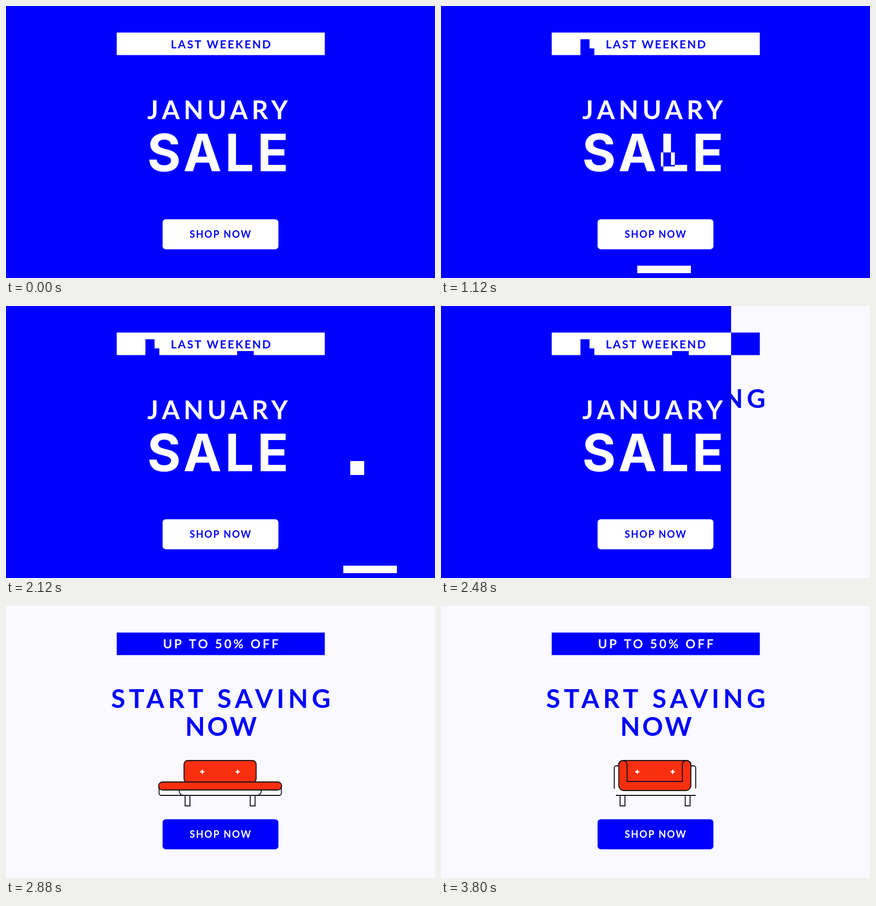
Recreate the animation shown at these times as an HTML page with a canvas. Size 800 by 507 pixels, loop 3.92 s.

```html
<!DOCTYPE html>
<html lang="en">
<head>
<meta charset="utf-8">
<title>January sale</title>
<style>
  html, body { margin: 0; width: 100%; height: 100%; overflow: hidden; background: #00f; }
  canvas { display: block; width: 100vw; height: 100vh; }
</style>
</head>
<body>
<canvas id="stage" width="800" height="507"></canvas>
<script>
const ctx = document.getElementById('stage').getContext('2d');
const W = 800, H = 507, LOOP = 3920, STEP = 40;
const BLUE = '#0000ff', WHITE = '#ffffff', PAPER = '#f9f9ff', RED = '#fa2f0f', INK = '#17121c';
const SANS = 'Lato, "Open Sans", sans-serif', HEAVY = 'Inter, Roboto, sans-serif';

const key = (t, x, y) => ({ t, x, y });

// The ball flies straight from bounce to bounce, then misses the paddle
const BALL_TOP = 62, PADDLE_TOP = 484, BALL = 26, REST = PADDLE_TOP - BALL;
const bounces = [
  key(0, -48, 292), key(232, 84, REST), key(680, 260, BALL_TOP), key(965, 387, REST),
  key(1280, 434, 83), key(1560, 462, REST), key(1920, 643, 1), key(2280, 642, 520)
];
const paddle = [
  key(0, -100), key(520, 127), key(1120, 366), key(1560, 400), key(2120, 629), key(2280, 682)
];
const WIPE_START = 2440, WIPE_TIME = 280;
const SOFA_START = 2880, SOFA_TIME = 400 / 3;

function along(path, t) {
  const i = path.findIndex(k => k.t > t);
  if (i < 0) return path[path.length - 1];
  const a = path[i - 1], b = path[i], p = (t - a.t) / (b.t - a.t);
  return { x: Math.round(a.x + (b.x - a.x) * p), y: Math.round(a.y + (b.y - a.y) * p) };
}

function rect(x, y, w, h, color) {
  ctx.fillStyle = color;
  ctx.fillRect(x, y, w, h);
}

function text(str, cx, y, size, spacing, color, font = SANS) {
  ctx.font = `700 ${size}px ${font}`;
  ctx.letterSpacing = spacing + 'px';
  ctx.textAlign = 'center';
  ctx.fillStyle = color;
  ctx.fillText(str, cx + spacing / 2, y);
}

function stroke() {
  ctx.strokeStyle = INK;
  ctx.lineWidth = 1.8;
  ctx.stroke();
}

function shape(x, y, w, h, r, fill) {
  ctx.beginPath();
  ctx.roundRect(x, y, w, h, r);
  ctx.fillStyle = fill;
  ctx.fill();
}

function box(...args) {
  shape(...args);
  stroke();
}

function banner(str, size, spacing, fill, ink) {
  rect(206.5, 49.5, 388, 42, fill);
  text(str, 400.5, 78.5, size, spacing, ink);
}

function button(fill, ink) {
  shape(292, 397.5, 216, 56, 6, fill);
  text('SHOP NOW', 399.5, 432, 18, 1.9, ink);
}

function studs() {
  for (const x of [366, 432]) {
    rect(x - 4, 307.8, 8, 2.4, WHITE);
    rect(x - 1.2, 305, 2.4, 8, WHITE);
  }
}

function legs() {
  for (const x of [334, 455.5]) box(x, 353, 9, 19.5, 0, WHITE);
}

function daybed() {
  box(332, 288, 134.5, 41, 7, RED);
  box(285.5, 336, 228, 17, [0, 0, 4, 4], WHITE);
  box(323, 340, 153, 13, [0, 0, 8, 8], WHITE);
  box(284.5, 328, 229.5, 15, 7.5, RED);
}

function loveseat() {
  for (const x of [323, 463]) box(x, 298, 12, 44, 4, WHITE);
  shape(323, 340, 154, 13, 3, WHITE);
  rect(326, 352, 149, 2, INK);
  box(331.5, 288, 134.5, 56, [8, 8, 10, 10], RED);
  ctx.beginPath();
  ctx.arc(339, 296, 8, Math.PI, 0);
  ctx.lineTo(347, 327);
  ctx.lineTo(450, 327);
  ctx.arc(458, 296, 8, Math.PI, 0);
  stroke();
}

function settee() {
  box(304, 341, 190, 12, 3, WHITE);
  box(331.5, 288, 134.5, 42, 7, RED);
  box(322, 328, 154, 15, 5, RED);
  for (const x of [304, 476]) box(x, 309, 18, 40, [7, 7, 2, 2], RED);
}

const SOFAS = [daybed, loveseat, settee];

function gameScene(t) {
  rect(0, 0, W, H, BLUE);
  banner('LAST WEEKEND', 21, 2.45, WHITE, BLUE);
  text('JANUARY', 394.5, 210.5, 48, 7.2, WHITE);
  text('SALE', 395, 307.5, 96, 6, WHITE, HEAVY);
  button(WHITE, BLUE);
  rect(along(paddle, t).x, PADDLE_TOP, 100, 14, WHITE);

  // Yellow difference swaps blue and white under the ball
  const ball = along(bounces, t);
  ctx.globalCompositeOperation = 'difference';
  rect(ball.x, ball.y, BALL, BALL, '#ffff00');
  ctx.globalCompositeOperation = 'source-over';

  // Pieces knocked out of the banner
  if (t >= 680) {
    rect(260, BALL_TOP, 17, 30, BLUE);
    rect(277, 79, 9, 13, BLUE);
  }
  if (t >= 1280) rect(431, 84, 31, 8, BLUE);
}

function offerScene(t) {
  rect(0, 0, W, H, PAPER);
  banner('UP TO 50% OFF', 23, 3.8, BLUE, WHITE);
  text('START SAVING', 400.5, 190, 48, 7.1, BLUE);
  text('NOW', 401, 242, 48, 4, BLUE);
  button(BLUE, WHITE);
  if (t >= SOFA_START) {
    const slot = Math.floor((t - SOFA_START + STEP / 2) / SOFA_TIME);
    legs();
    SOFAS[slot % SOFAS.length]();
    studs();
  }
}

function draw(now) {
  const t = Math.floor(now % LOOP / STEP) * STEP;
  const wipe = Math.min(1, Math.max(0, (t - WIPE_START) / WIPE_TIME));
  const edge = Math.round(W * (1 - wipe) ** 2.54);
  if (edge > 0) gameScene(t);
  ctx.save();
  ctx.beginPath();
  ctx.rect(edge, 0, W - edge, H);
  ctx.clip();
  offerScene(t);
  ctx.restore();
}

let start;
function tick(now) {
  start ??= now;
  draw(now - start);
  requestAnimationFrame(tick);
}
requestAnimationFrame(tick);
</script>
</body>
</html>
```
